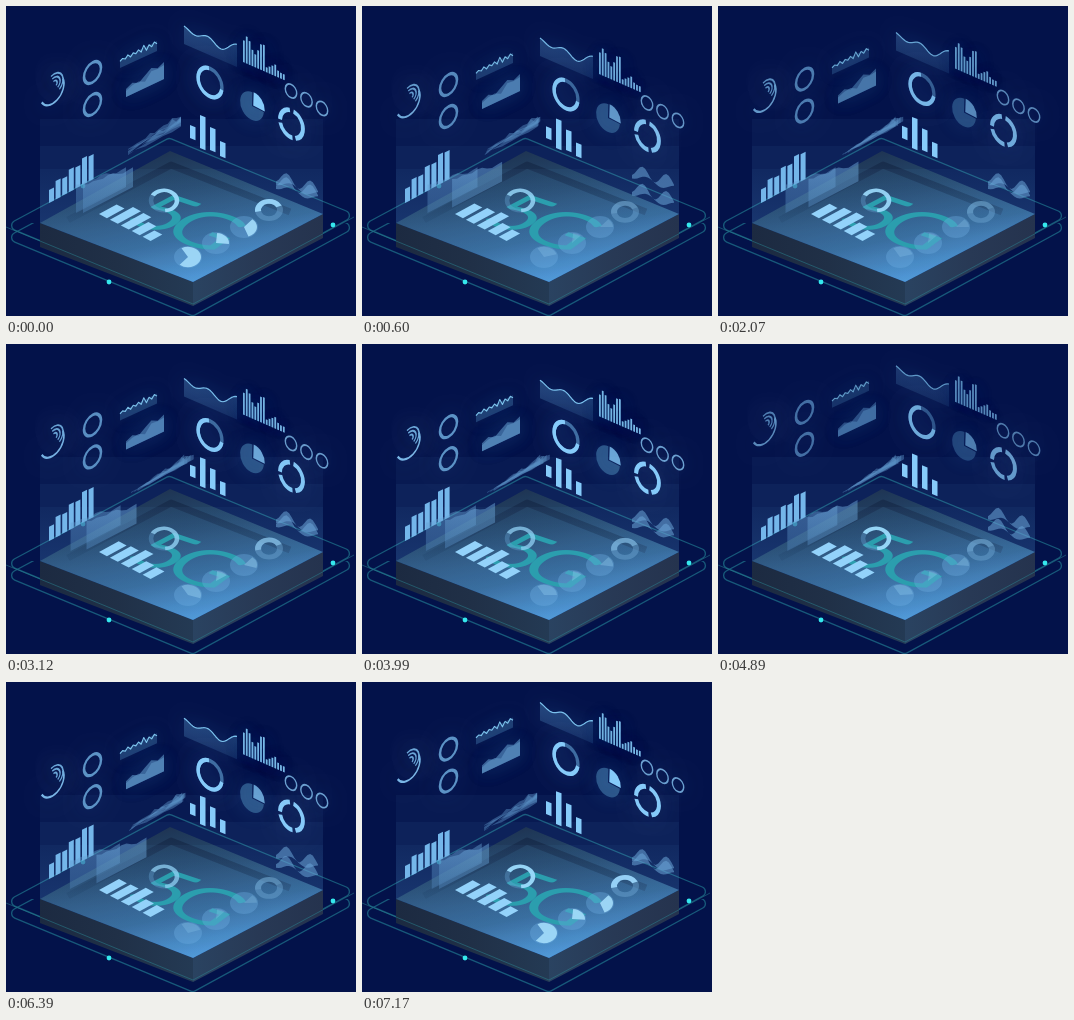
Animation, 350 px wide and 310 px high, one loop 7200 ms. Source, as an HTML page with a canvas:

```html
<!DOCTYPE html>
<html lang="en">
<head>
<meta charset="utf-8">
<title>5G dashboard</title>
<style>
html, body { margin: 0; width: 100%; height: 100%; overflow: hidden; background: #03124a; }
canvas { display: block; width: 350px; height: 310px; }
</style>
</head>
<body>
<canvas id="stage" width="350" height="310"></canvas>
<script>
const c = document.getElementById('stage').getContext('2d');
const LOOP = 7.2, TAU = Math.PI * 2, RAD = Math.PI / 180;
const { sin, cos, abs, max, min } = Math;
const LIGHT = '#86cbfa', STEEL = '#5c93c6', DEEP = '#2f5a8e';

// Motion curves
const triangle = (t, p) => 1 - abs(1 - 2 * ((t / p) % 1));
const wave = (t, p) => (1 - cos(TAU * t / p)) / 2;

// Repeatable noise in 0..1
const noise = n => abs(sin(n * 127.1 + 3.7) * 43758.5453) % 1;

// n + 1 points between two ends, each raised by height(k, i)
function strip([x0, y0], [x1, y1], n, height = () => 0) {
  return Array.from({ length: n + 1 }, (_, i) => {
    const k = i / n;
    return [x0 + (x1 - x0) * k, y0 + (y1 - y0) * k - height(k, i)];
  });
}
function poly(points, fill, alpha = 1) {
  c.save();
  c.globalAlpha *= alpha;
  c.fillStyle = fill;
  c.beginPath();
  points.forEach(([x, y]) => c.lineTo(x, y));
  c.fill();
  c.restore();
}
function line(points, color, width) {
  c.strokeStyle = color;
  c.lineWidth = width;
  c.lineJoin = 'round';
  c.beginPath();
  points.forEach(([x, y]) => c.lineTo(x, y));
  c.stroke();
}
const column = (x, y, w, h, slope, fill) =>
  poly([[x, y], [x, y - h], [x + w, y - h + w * slope], [x + w, y + w * slope]], fill);

function fade(x0, y0, x1, y1, ...colors) {
  const g = c.createLinearGradient(x0, y0, x1, y1);
  colors.forEach((k, i) => g.addColorStop(i / (colors.length - 1), k));
  return g;
}
function at(matrix, x, y, draw) {
  c.save();
  c.transform(...matrix, x, y);
  draw();
  c.restore();
}
const LEFT = [.85, -.45, 0, 1], RIGHT = [.85, .35, 0, 1];
const FLAT = [1, 0, 0, .78], TEXT = [.9, .3, -.62, .46], BARS = [.88, .46, -.88, .48];

function arc(r, w, color, alpha = 1, from = 0, to = 360) {
  c.save();
  c.globalAlpha *= alpha;
  c.strokeStyle = color;
  c.lineWidth = w;
  c.beginPath();
  c.arc(0, 0, r, from * RAD, to * RAD);
  c.stroke();
  c.restore();
}
function wedge(r, color, alpha = 1, from = 0, to = 360) {
  c.save();
  c.globalAlpha *= alpha;
  c.fillStyle = color;
  c.beginPath();
  if (to - from < 360) c.moveTo(0, 0);
  c.arc(0, 0, r, from * RAD, to * RAD);
  c.fill();
  c.restore();
}
function dot(x, y, alpha = 1) {
  at([1, 0, 0, 1], x, y, () => wedge(2.4, '#35e8ee', alpha));
}
function roundedRing(corners, color) {
  const [a, b] = corners;
  c.strokeStyle = color;
  c.lineWidth = 1.3;
  c.beginPath();
  c.moveTo((a[0] + b[0]) / 2, (a[1] + b[1]) / 2);
  corners.forEach((_, i) => c.arcTo(...corners[(i + 1) % 4], ...corners[(i + 2) % 4], 5));
  c.closePath();
  c.stroke();
}

const WEST = [34, 217], NORTH = [164, 145], EAST = [317, 208], SOUTH = [187, 276];
const lower = ([x, y]) => [x, y + 24];

function platform() {
  const ring = [[-1, 220], [163, 132], [350, 209], [187, 298]];
  roundedRing(ring, '#17597a');
  c.save();
  c.beginPath();
  c.rect(0, 217, 350, 93);
  c.clip();
  roundedRing(ring.map(([x, y]) => [x, y + 12]), '#17597a');
  c.restore();
  dot(77, 180, .5);

  poly([WEST, SOUTH, lower(SOUTH), lower(WEST)], fade(34, 0, 187, 0, '#1c2a41', '#203047', '#243a54'));
  poly([SOUTH, EAST, lower(EAST), lower(SOUTH)], fade(187, 0, 317, 0, '#2a4361', '#283955', '#25334e'));
  poly([WEST, NORTH, EAST, SOUTH], fade(160, 145, 187, 276, '#162743', '#213f62', '#305d8b', '#4f99da'));
  line([[62, 214], [165, 159], [284, 206]], fade(0, 158, 0, 216, '#101f3b', 'rgba(22,44,78,.3)'), 7);
  c.save();
  c.globalAlpha = .5;
  line([[0, 221], [187, 298], [348, 211]], '#2a8694', 1);
  c.restore();
  dot(103, 276);
  dot(327, 219);

  // Stepped haze above the plate
  c.save();
  c.beginPath();
  [[34, 113], [317, 113], EAST, SOUTH, WEST].forEach(p => c.lineTo(...p));
  c.clip();
  c.fillStyle = 'rgba(90,155,210,.055)';
  for (const y of [113, 140, 163]) c.fillRect(34, y, 283, 170);
  c.fillStyle = fade(0, 165, 0, 225, 'rgba(80,150,215,0)', 'rgba(80,150,215,.13)');
  c.fillRect(34, 165, 283, 115);
  c.restore();
}

function label() {
  c.fillStyle = '#2b9eae';
  c.textAlign = 'center';
  c.font = '90px Lato, sans-serif';
  at(TEXT, 139, 222, () => c.fillText('5', 0, 0));
  at(TEXT, 180, 238, () => c.fillText('G', 0, 0));
}

function floorCharts(u, v, spark) {
  at(BARS, 93, 208, () => {
    c.fillStyle = '#93d2fa';
    for (let i = 0; i < 5; i++) {
      const len = 20 + 7 * sin(i * 1.1) + 4 * u * cos(i * Math.PI);
      c.fillRect(i * 12.4, -len, 9, len);
    }
  });
  at(FLAT, 158, 194.5, () => {
    arc(13, 4.5, '#6aa9da', .35);
    arc(13, 4.5, '#9bdafb', .2 + .75 * (1 - u * u), -150, 85);
  });
  const pies = [[182, 251, 250], [210, 237, 90], [238, 221, 120]];
  pies.forEach(([x, y, sweep], i) => at(FLAT, x, y, () => {
    wedge(14, '#6fb0e2', .36);
    wedge(13, '#a4dcfb', .2 + .7 * spark, -120 + 35 * i, -120 + 35 * i + sweep * (.4 + .6 * spark));
  }));
  at(FLAT, 263, 204 + 2 * v, () => {
    arc(11, 6, '#72acd9', .42);
    arc(11, 6, '#99d5fa', .15 + .4 * (1 - v) + .4 * spark, 170, 335);
  });
}

function wallCharts(t, u, v) {
  // Rising columns on the left wall
  for (let i = 0; i < 7; i++)
    column(43 + i * 6.6, 197 - i * 3.6, 5, 13 + 2 * i + 3.5 * (i % 2) + u * (2 + i), -.5, '#74b6ea');

  // Sliding area stack
  const blue = fade(0, 160, 0, 207, '#72b0e2', '#4f84ba');
  const area = (x, y, alpha) => poly([
    ...strip([x, y + 182], [x + 50, y + 164], 10, (k, i) => 4 * noise(i)),
    [x + 50, y + 181], [x, y + 207]], blue, alpha);
  area(70 - 9 * u, 0, .4);
  area(77 + 14 * v, -6 * v, .45);

  // Drifting ridges
  const drift = 13 * sin(Math.PI * t / LOOP);
  for (let j = 0; j < 4; j++) {
    const x = drift * (.25 + j * .25), y = 6 - 2 * j;
    poly([
      ...strip([122 + x, 143 + y], [175 + x, 108 + y], 12, (k, i) => 7 * (noise(i + j * 5) - .5) * k),
      ...strip([175 + x, 117 + y], [122 + x, 145 + y], 6, (k, i) => 3 * noise(i + j))],
      '#5f98cc', .42);
  }

  // Columns on the right wall
  [13, 33, 23, 15].forEach((h, i) =>
    column(184 + 10 * i, 132 + 6 * i + (i === 1 ? 4 : 0), 5.5, h * (1 - .21 * u), .4, LIGHT));

  // Parting ribbons
  const gap = wave(t, LOOP / 7);
  for (const side of [-1, 1]) {
    const y = 2 * side + 7 * gap * side;
    poly([
      ...strip([270, 172 + y], [312, 185 + y], 16, k => 6 * sin(k * 11 - 1.2)),
      ...strip([312, 191 + y], [270, 178 + y], 16, k => 3 * sin(k * 9 + 2))],
      '#6ba5d8', .55);
  }
}

function floating(u, spark) {
  c.save();
  c.translate(0, 24 * u);
  c.globalAlpha = .68 + .32 * max(min(1, u * 1.5), spark);
  c.shadowColor = 'rgba(52,108,176,.34)';
  c.shadowBlur = 18;

  at(LEFT, 46, 84, () => {
    arc(14, 2, '#79b6e6', 1, -25, 150);
    c.translate(3, -5);
    for (const r of [3, 6.5, 10]) arc(r, 1.7, '#6ba6d8', 1, -115, 55);
  });
  for (const y of [66.5, 98.5]) at(LEFT, 86.5, y, () => arc(10, 3, STEEL));

  // Zigzag line over a band
  poly([[114, 54], [151, 35], [151, 45], [114, 62]], DEEP, .6);
  line(strip([114, 55], [151, 37], 14, (k, i) => (i % 2 ? 1 : -.4) * (1 + 6 * k * noise(i + 2))), '#7cc3ec', 1.1);

  // Layered areas
  for (const j of [0, 1])
    poly([...strip([120, 83 + 2 * j], [158, 56 + 3 * j], 6, (k, i) => 4 * sin(i * 2.1 - j * 1.3) * sin(Math.PI * k)),
      [158, 73], [120, 91]], STEEL, .62);

  // Smooth curve with its shaded area
  const curve = strip([178, 20], [231, 41], 30, k => 7 * sin(k * 11 + 3.1) * k * (1.25 - k) * 1.6 - 5 * sin(Math.PI * k));
  poly([...curve, [231, 61], [178, 38]], fade(0, 22, 0, 60, '#3f6da3', '#1a3b72'), .55);
  line(curve, '#7bc2ee', 1.2);

  for (let i = 0; i < 15; i++) {
    const h = i < 8 ? 20 + 7 * cos(i * 1.15 - 1.3) : 5 + 8 * noise(i) * noise(i + 1);
    column(237 + i * 2.85, 56 + i * 1.25, 1.8, h, .4, '#79bae8');
  }

  at(RIGHT, 204, 76.5, () => {
    arc(14, 4, '#4577ab', .9);
    arc(14, 4, LIGHT, 1, 10, 265);
  });
  at(RIGHT, 246, 100, () => {
    wedge(14, DEEP, .95, 5, 272);
    c.translate(1.5, -1);
    wedge(13.5, LIGHT, .75 + .25 * spark, -88, 5);
  });
  at(RIGHT, 285.5, 118, () => {
    for (const from of [-80, 85, 180]) arc(13.5, 4.5, LIGHT, 1, from, from < 0 ? 70 : from + 82);
  });
  for (let i = 0; i < 3; i++)
    at(RIGHT, 285 + 15.5 * i, 85 + 8.7 * i, () => arc(6.7, 1.7, '#6ba0d0'));
  c.restore();
}

function frame(now) {
  const t = (now / 1000) % LOOP;
  const u = triangle(t, 2.4), v = wave(t, 1.44);
  const spark = (1 - wave(t, 2.4)) * (1 - v);
  c.fillStyle = '#03124a';
  c.fillRect(0, 0, 350, 310);
  platform();
  label();
  floorCharts(u, v, spark);
  wallCharts(t, u, v);
  floating(u, spark);
}
const start = performance.now();
function tick() {
  frame(performance.now() - start);
  requestAnimationFrame(tick);
}
tick();
</script>
</body>
</html>
```
